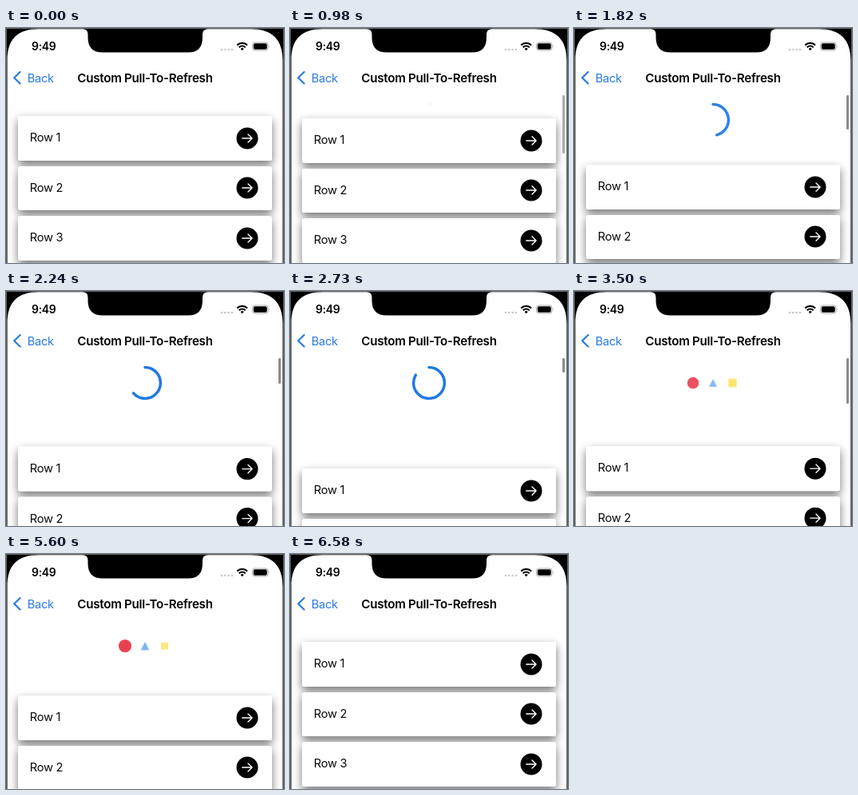
An HTML page that plays this animation: 348 by 294 pixels, repeating every 6.86 s.

```html
<!DOCTYPE html>
<html lang="en">
<head>
<meta charset="utf-8">
<title>Pull to refresh</title>
<style>
  html, body { margin: 0; width: 100%; height: 100%; overflow: hidden; background: #fff; }
  .stage {
    position: relative; width: 348px; height: 294px; overflow: hidden; background: #fff;
    font: 14.7px Inter, "Liberation Sans", sans-serif; letter-spacing: -.02em; color: #0a0a0a;
  }
  .stage > svg { position: absolute; left: 0; top: 0; }
  .bold { font-weight: 600; }

  /* every timeline shares one loop */
  .rows, .ring, .shapes, .bar { animation: 6.86s linear infinite; }

  .rows { position: absolute; left: 15px; top: 110px; width: 317.5px; animation-name: pull; }
  .row {
    position: relative; box-sizing: border-box; height: 55.5px; margin-bottom: 7px; padding-left: 14.7px;
    line-height: 55.5px; background: #fff; border-radius: 3px;
  }
  /* shadows lie below all cards */
  .row::before {
    content: ""; position: absolute; inset: 0; z-index: -1; border-radius: 3px;
    box-shadow: 0 5px 12px rgba(0, 0, 0, .55);
  }
  .row svg { position: absolute; left: 273px; top: 13.7px; }

  .ring {
    fill: none; stroke: #2079e2; stroke-width: 3.5; stroke-linecap: round;
    stroke-dasharray: 1 2; transform-origin: 174px 115px; animation-name: fill, ringFade;
  }
  .shapes { animation-name: shapesFade; }
  .shapes * {
    transform-box: fill-box; transform-origin: center;
    animation: pulse .98s ease-in-out infinite;
  }
  .shapes circle { fill: #e93f4e; animation-delay: -.305s; }
  .shapes path { fill: #2f88e8; animation-delay: -.958s; }
  .shapes rect { fill: #f9db35; animation-delay: -.631s; }

  .bar {
    position: absolute; left: 341.4px; top: 84px; width: 2.6px; border-radius: 1.3px;
    background: #8c8c8c; animation-name: barSize, barFade;
  }

  @keyframes pull {
    0%, 13.78% { transform: translateY(0); }
    18.37% { transform: translateY(26px); }
    26.53% { transform: translateY(61px); }
    39.8% { transform: translateY(112px); }
    46.5% { transform: translateY(134px); }
    47.96% { transform: translateY(134px); animation-timing-function: cubic-bezier(.2, .7, .3, 1); }
    58.3% { transform: translateY(67px); }
    89.36% { transform: translateY(67px); animation-timing-function: ease-in-out; }
    95.63%, 100% { transform: translateY(0); }
  }
  @keyframes fill {
    0%, 13.78% { stroke-dashoffset: 1; }
    18.37% { stroke-dashoffset: .806; }
    26.53% { stroke-dashoffset: .54; }
    39.8% { stroke-dashoffset: .164; }
    46.5%, 100% { stroke-dashoffset: 0; }
  }
  @keyframes ringFade {
    0%, 13.78% { opacity: 0; transform: none; }
    18.37% { opacity: .42; }
    26.53% { opacity: .93; }
    29%, 46.9% { opacity: 1; transform: none; }
    49.6%, 100% { opacity: 0; transform: scale(1.15); }
  }
  @keyframes shapesFade {
    0%, 47.7% { opacity: 0; }
    50.7%, 89.36% { opacity: 1; }
    93.6%, 100% { opacity: 0; }
  }
  @keyframes pulse {
    0%, 100% { transform: none; opacity: 1; }
    33%, 67% { transform: scale(.61); opacity: .63; }
    50% { transform: scale(.57); opacity: .58; }
  }
  @keyframes barSize {
    0%, 13.78% { height: 74px; }
    18.37% { height: 61px; }
    26.53% { height: 43px; }
    39.8% { height: 18.5px; }
    46.5% { height: 8px; }
    47.96% { height: 8px; animation-timing-function: cubic-bezier(.2, .7, .3, 1); }
    58.3%, 100% { height: 74px; }
  }
  @keyframes barFade {
    0%, 13.78% { opacity: 0; }
    14.5%, 72.2% { opacity: 1; }
    76.5%, 100% { opacity: 0; }
  }
</style>
</head>
<body>
<div class="stage">
  <svg width="348" height="294">
    <path class="ring" pathLength="1" d="M174 95.6a19.4 19.4 0 0 1 0 38.8a19.4 19.4 0 0 1 0-38.8"/>
    <g class="shapes">
      <circle cx="149" cy="115" r="8.1"/>
      <path d="M174 106.5l8.7 17h-17.4z"/>
      <rect x="191.2" y="107.7" width="14.6" height="14.6"/>
    </g>
  </svg>

  <div class="rows">
    <div class="row">Row 1<svg width="28" height="28"><use href="#go"/></svg></div>
    <div class="row">Row 2<svg width="28" height="28"><use href="#go"/></svg></div>
    <div class="row">Row 3<svg width="28" height="28"><use href="#go"/></svg></div>
  </div>
  <div class="bar"></div>

  <svg width="348" height="294">
    <defs>
      <g id="go">
        <circle cx="14" cy="14" r="13.5"/>
        <path d="M7.8 14h12.300M15 8.900l5.100 5.100l-5.100 5.100" fill="none" stroke="#fff" stroke-width="1.400"
          stroke-linecap="round" stroke-linejoin="round"/>
      </g>
    </defs>

    <!-- bezel and notch -->
    <path fill-rule="evenodd" d="M0 0H348V294H0Z
      M1.6 294V41C1.6 14 14 1.200 41 1.200H96Q102.500 1.200 102.500 8V12Q102.500 30.600 121 30.600H228
      Q246 30.600 246 12V8Q246 1.200 253 1.200H306C333 1.200 346.400 14 346.400 41V294Z"/>
    <path d="M.5 294V.5H347.500V294" fill="none" stroke="#666"/>

    <!-- status bar -->
    <text class="bold" x="32" y="28" font-size="14">9:49</text>
    <g fill="#c6c6c8">
      <circle cx="270" cy="27" r="1.300"/>
      <circle cx="274.300" cy="27" r="1.300"/>
      <circle cx="278.600" cy="27" r="1.300"/>
      <circle cx="282.900" cy="27" r="1.300"/>
    </g>
    <g fill="none" stroke="#000" stroke-width="2.200">
      <path d="M289.300 21.500a9 9 0 0 1 12.800 0"/>
      <path d="M291.700 24.200a5.600 5.600 0 0 1 8 0"/>
    </g>
    <path d="M295.700 28.300l-2.100-2.300a3 3 0 0 1 4.200 0z"/>
    <rect x="308.500" y="18" width="19.500" height="10" rx="3" fill="none" stroke="#a9a9ab"/>
    <rect x="309.800" y="19.300" width="16.900" height="7.400" rx="1.800"/>
    <path d="M329.300 21.200q1.500 1.800 0 3.600z" fill="#a9a9ab"/>

    <!-- navigation bar -->
    <path d="M17.700 55l-7.500 7.200l7.500 7.300" fill="none" stroke="#2b7be0" stroke-width="2.200"
      stroke-linecap="round" stroke-linejoin="round"/>
    <text x="26.700" y="67.500" fill="#2b7be0">Back</text>
    <text class="bold" x="174" y="67.600" font-size="15.2" text-anchor="middle">Custom Pull-To-Refresh</text>
  </svg>
</div>
</body>
</html>
```
